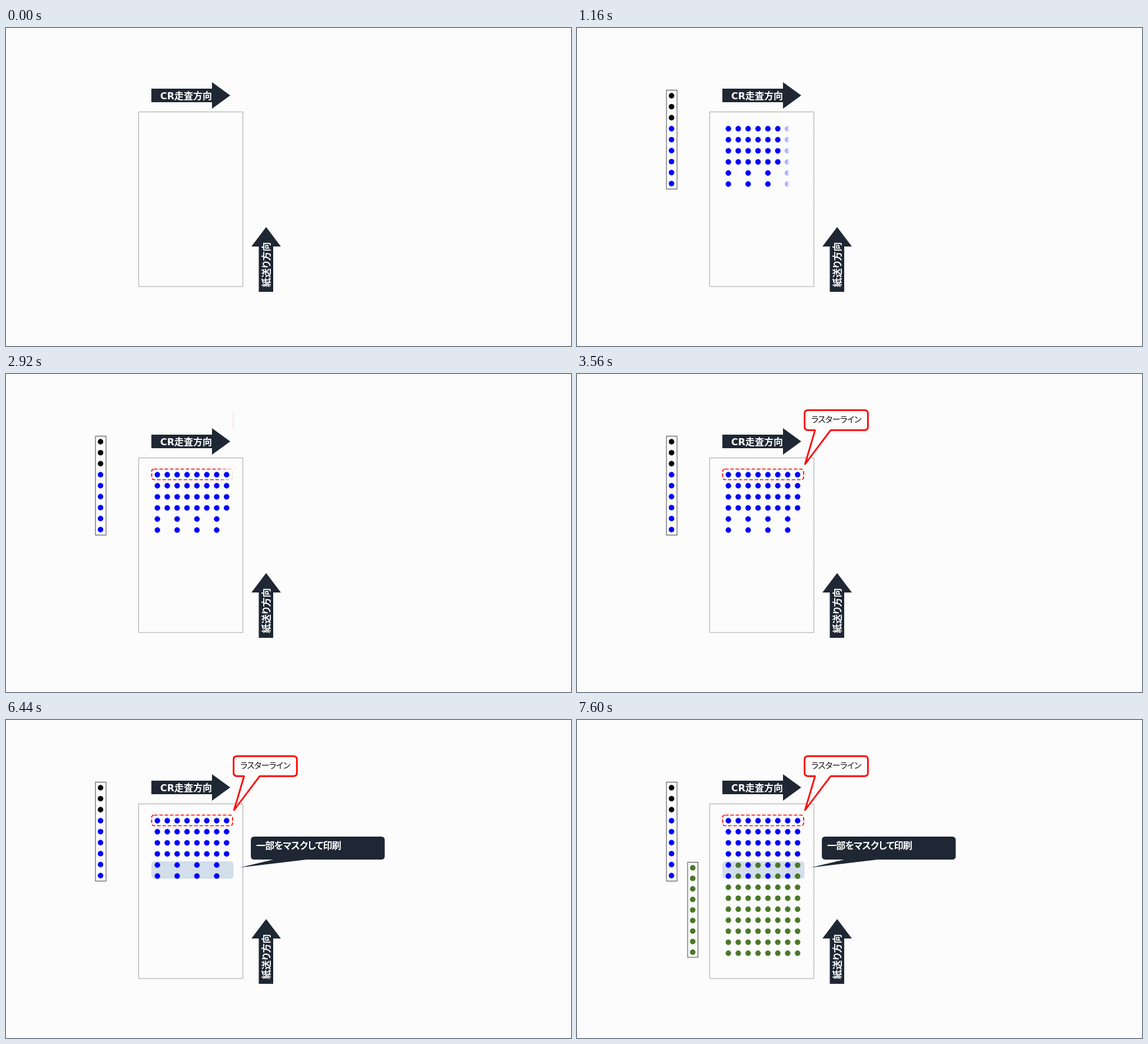
An HTML page that plays this animation: 960x540 px, repeating every 8 s.

```html
<!DOCTYPE html>
<html lang="ja">
<head>
<meta charset="utf-8">
<title>ラスターライン</title>
<style>
  html, body { margin: 0; width: 100%; height: 100%; overflow: hidden; background: #fcfcfc; }
  svg { display: block; width: 960px; height: 540px; }
  text { font: bold 16px "Noto Sans CJK JP", "Noto Sans CJK", sans-serif; font-feature-settings: "palt"; fill: #fff; }
  .latin { font-family: "DejaVu Sans", sans-serif; }
  .navy { fill: #1e2733; }
  .frame { fill: none; stroke: #8a8a8a; stroke-dasharray: 1.5 .5; }
  .head { fill: #fdfdfd; stroke: #444; }
  .blue { fill: #00f; }
  .green { fill: #4b7829; }
  .red { stroke: #f00; stroke-linejoin: round; }
  .label { font-weight: 300; font-size: 14.2px; letter-spacing: -.5px; fill: #111; text-anchor: middle; }
  .note { letter-spacing: -.7px; }

  /* Hard appearances */
  #head1, #head2, #band, #note { animation: 8s step-end infinite; }
  #head1 { animation-name: show-head1; }
  #head2 { animation-name: show-head2; }
  #band { animation-name: show-band; }
  #note { animation-name: show-note; }
  @keyframes show-head1 { 0% { opacity: 0 } 9.95%, 100% { opacity: 1 } }
  @keyframes show-band { 0% { opacity: 0 } 55.45%, 100% { opacity: 1 } }
  @keyframes show-note { 0% { opacity: 0 } 71.95%, 100% { opacity: 1 } }
  @keyframes show-head2 { 0% { opacity: 0 } 88.45%, 100% { opacity: 1 } }

  /* Soft wipes, left to right, half a second each */
  .wipe { animation: 8s linear infinite; }
  #wipe1 { animation-name: wipe-blue; }
  #wipe2 { animation-name: wipe-callout; }
  #wipe3 { animation-name: wipe-green; }
  @keyframes wipe-blue {
    0%, 9.84% { transform: translateX(252px) } 16.09%, 100% { transform: translateX(398px) }
  }
  @keyframes wipe-callout {
    0%, 33.34% { transform: translateX(245px) } 39.59%, 100% { transform: translateX(528px) }
  }
  @keyframes wipe-green {
    0%, 88.44% { transform: translateX(252px) } 94.69%, 100% { transform: translateX(398px) }
  }
</style>
</head>
<body>
<svg viewBox="0 0 960 540">
  <defs>
    <linearGradient id="edge" gradientUnits="userSpaceOnUse" x1="-17" x2="0" y1="0" y2="0">
      <stop stop-color="#fff"/><stop offset="1" stop-color="#fff" stop-opacity="0"/>
    </linearGradient>
    <linearGradient id="wideEdge" gradientUnits="userSpaceOnUse" x1="-31" x2="0" y1="0" y2="0">
      <stop stop-color="#fff"/><stop offset="1" stop-color="#fff" stop-opacity="0"/>
    </linearGradient>
    <mask id="mask1" maskUnits="userSpaceOnUse" x="0" y="0" width="960" height="540">
      <rect id="wipe1" class="wipe" x="-600" width="600" height="540" fill="url(#edge)"/>
    </mask>
    <mask id="mask2" maskUnits="userSpaceOnUse" x="0" y="0" width="960" height="540">
      <rect id="wipe2" class="wipe" x="-600" width="600" height="540" fill="url(#wideEdge)"/>
    </mask>
    <mask id="mask3" maskUnits="userSpaceOnUse" x="0" y="0" width="960" height="540">
      <rect id="wipe3" class="wipe" x="-600" width="600" height="540" fill="url(#edge)"/>
    </mask>
  </defs>

  <rect class="frame" x="225.5" y="142.5" width="177" height="296.5"/>

  <path class="navy" d="M247 103H350V92L381 114.5 350 137V126H247Z"/>
  <text x="350" y="120.5" text-anchor="end"><tspan class="latin">CR</tspan>走査方向</text>
  <path class="navy" d="M429.5 448V371H417L442 338 467 371H454V448Z"/>
  <text transform="translate(448 440) rotate(-90)">紙送り方向</text>

  <g id="head1"><rect class="head" x="152" y="105.5" width="18" height="168"/></g>
  <g id="head2"><rect class="head" x="188" y="241.5" width="17.5" height="161.5"/></g>

  <rect id="band" x="247" y="240" width="139.5" height="29.5" rx="5" fill="#d2deea"/>
  <g id="print1" mask="url(#mask1)"></g>
  <g id="print2" mask="url(#mask3)"></g>

  <g mask="url(#mask2)">
    <rect class="red" x="247.5" y="161.5" width="137.5" height="18" rx="4" fill="none" stroke-width="1.7" stroke-dasharray="6 3"/>
    <path class="red" fill="#fdfdfd" stroke-width="2.8"
      d="M392.5 61.3H488.5Q494.3 61.3 494.3 67V89.5Q494.3 95.3 488.5 95.3H431L387.5 153 404.5 95.3H392.5Q386.7 95.3 386.7 89.5V67Q386.7 61.3 392.5 61.3Z"/>
    <text class="label" x="440.5" y="82">ラスターライン</text>
  </g>

  <g id="note">
    <path class="navy" d="M422 198H637.5Q643.5 198 643.5 204V231Q643.5 237 637.5 237H511L397.5 250.5 454 237H422Q416 237 416 231V204Q416 198 422 198Z"/>
    <text class="note" x="425" y="218.7">一部をマスクして印刷</text>
  </g>
</svg>
<script>
  const byId = id => document.getElementById(id);

  function dot(parent, x, y, color) {
    const el = document.createElementNS("http://www.w3.org/2000/svg", "ellipse");
    const attrs = { cx: x, cy: y, rx: 4.7, ry: 4.7, class: color };
    for (const key in attrs) el.setAttribute(key, attrs[key]);
    byId(parent).append(el);
  }

  const column = i => 257.2 + 16.8 * i;

  for (let row = 0; row < 9; row++) {
    dot("head1", 160.6, 115 + 18.65 * row, row < 3 ? "black" : "blue");
    dot("head2", 196.6, 251 + 17.9 * row, "green");
    for (let i = 0; i < 8; i++) {
      // The two passes interleave on their two shared rows.
      if (row < 4 || (row < 6 && i % 2 === 0)) dot("print1", column(i), 171 + 18.8 * row, "blue");
      if (row > 1 || i % 2) dot("print2", column(i), 246.6 + 18.68 * row, "green");
    }
  }
</script>
</body>
</html>
```
